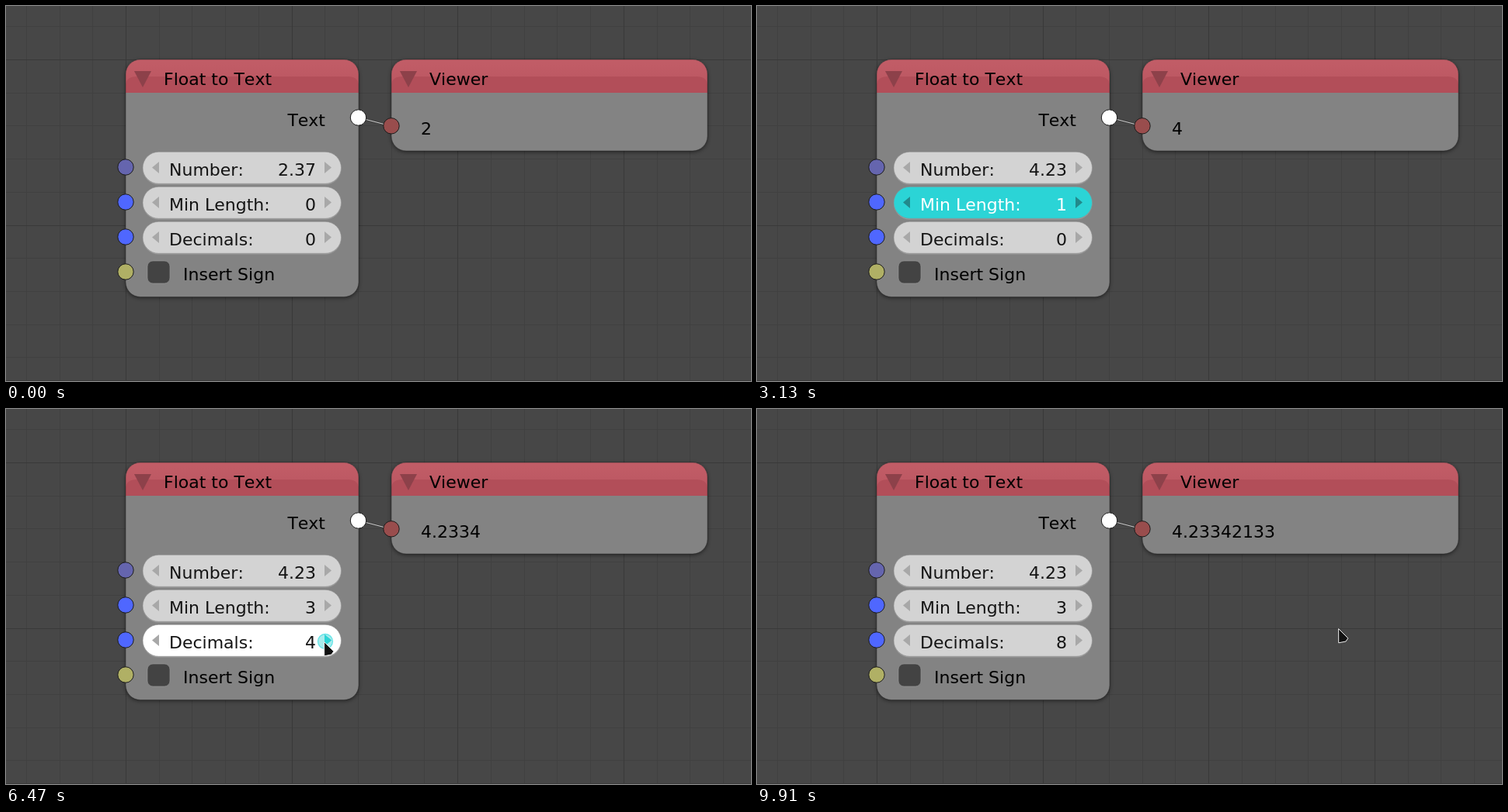
An HTML page that plays this animation: 959 by 484 pixels, repeating every 9950 ms.

```html
<!DOCTYPE html>
<html lang="en">
<head>
<meta charset="utf-8">
<title>Float to Text node</title>
<style>
  html, body { margin: 0; width: 100%; height: 100%; overflow: hidden; background: #474747; }
  svg { display: block; width: 959px; height: 484px; }
  text { font: 22px "DejaVu Sans", sans-serif; font-kerning: none; fill: #000; white-space: pre; }
  .end { text-anchor: end; }
  .field text { fill: #141414; }
  .pill { fill: #d3d3d3; stroke: #8a8a8a; stroke-opacity: .6; }
  .arrow { fill: #a8a8a8; }
  .hover .pill { fill: #fff; }
  .drag .pill { fill: #2bd4d6; }
  .drag .arrow { fill: #22898b; }
  .drag text { fill: #fff; }
</style>
</head>
<body>
<svg id="stage" viewBox="0 0 959 484">
  <defs>
    <linearGradient id="head" x1="0" y1="0" x2="0" y2="1">
      <stop offset="0" stop-color="#c25d67"/><stop offset="1" stop-color="#b95560"/>
    </linearGradient>
    <filter id="soft" x="-10%" y="-10%" width="120%" height="120%">
      <feGaussianBlur stdDeviation="2.5"/>
    </filter>
  </defs>
</svg>
<script>
const LOOP = 9950;
const stage = document.getElementById('stage');

function add(tag, attrs, parent = stage, label) {
  const el = document.createElementNS('http://www.w3.org/2000/svg', tag);
  for (const k in attrs) el.setAttribute(k, attrs[k]);
  if (label !== undefined) el.textContent = label;
  return parent.appendChild(el);
}

const write = (x, y, label, parent, cls = '') => add('text', { x, y, class: cls }, parent, label);

// ---- background grid, every fifth line darker ----
function grid(major) {
  const stroke = major ? '#393939' : '#404040';
  for (let i = -3; i < 19; i++) {
    if ((i % 5 === 0) !== major) continue;
    const shift = i * 42.72;
    add('path', { d: `M${Math.round(154 + shift) + .5} 0V484`, stroke });
    add('path', { d: `M0 ${Math.round(69 + shift) + .5}H959`, stroke });
  }
}
grid(false);
grid(true);
add('path', { d: 'M0 483.5H959', stroke: '#3a3a3a' });

// ---- nodes ----
function node(x, y, w, h, title) {
  const r = 19, box = { x, y, width: w, height: h, rx: r };
  add('rect', { ...box, y: y + 1.5, fill: '#000', opacity: .5, filter: 'url(#soft)' });
  add('rect', { ...box, fill: '#838383' });
  add('path', {
    d: `M${x} ${y + 43}v${r - 43}a${r} ${r} 0 0 1 ${r} ${-r}h${w - 2 * r}a${r} ${r} 0 0 1 ${r} ${r}v${43 - r}z`,
    fill: 'url(#head)'
  });
  add('path', { d: `M${x} ${y + 43}v-10q1 -11 14 -11h${w - 28}q13 0 14 11v10z`, fill: '#b24e59' });
  add('rect', { ...box, fill: 'none', stroke: '#222', 'stroke-opacity': .45 });
  add('path', { d: `M${x + 11} ${y + 15}h22l-11 21z`, fill: '#8d414a' });
  write(x + 49, y + 33, title);
}
node(154, 69, 300, 306.5, 'Float to Text');
node(496, 69, 407, 118, 'Viewer');
write(411, 155, 'Text', stage, 'end');
write(228, 354, 'Insert Sign');
const output = write(534, 166, '');

// ---- link and sockets ----
const link = { d: 'M454 144L496 155' };
add('path', { ...link, stroke: '#333', 'stroke-width': 3, opacity: .5 });
add('path', { ...link, stroke: '#c8c8c8', 'stroke-width': 1.2 });
const socket = (cx, cy, fill) => add('circle', { cx, cy, r: 10.2, fill, stroke: '#1c1c1c' });
['#6565ae', '#4f67ff', '#4f67ff', '#b0b065'].forEach((c, i) => socket(154, 208 + 45 * i, c));
socket(453.5, 144, '#fff');
socket(496, 154.8, '#994d4d');

// ---- number fields ----
const fields = ['Number:', 'Min Length:', 'Decimals:'].map((label, i) => {
  const y = 188 + 45 * i;
  const pill = { x: 176, width: 255.5, height: 41, rx: 20.5 };
  const g = add('g', {});
  add('rect', { ...pill, y: y + 1.5, fill: '#aaa', opacity: .7 }, g);
  add('rect', { ...pill, y: y + .3, class: 'pill' }, g);
  add('path', { class: 'arrow', d: `M188 ${y + 20.5}l9 -7.5v15z` }, g);
  add('path', { class: 'arrow', d: `M419 ${y + 20.5}l-9 -7.5v15z` }, g);
  write(210, y + 31, label, g);
  return { g, y, value: write(399, y + 31, '', g, 'end') };
});

const box = add('rect', { x: 182, y: 329, width: 29, height: 29, rx: 7, stroke: '#999', 'stroke-opacity': .6 });
const check = add('path', { d: 'M188 343l7 8l11 -19', fill: 'none', stroke: '#fff', 'stroke-width': 3.5 });

// ---- pointer and click pulse ----
const pulse = add('circle', { fill: '#2bd4d6', stroke: '#5fe3e6', 'stroke-width': 1.3 });
const pulseArrow = add('path', { d: 'M419 298.5l-9 -7.5v15z', fill: '#2bd4d6' });
const pointer = add('path', {
  d: 'M.6 .6L12.8 12.8L10 17L.7 18.8z',
  fill: '#111', stroke: '#eee', 'stroke-linejoin': 'round'
});

// ---- motion ----
const drags = [{ from: 640, to: 1670, row: 0 }, { from: 2620, to: 5140, row: 1 }];
const clicks = Array.from({ length: 8 }, (_, i) => 5870 + i * 193);
const presses = [...drags, ...clicks.map(to => ({ from: to - 60, to, row: 2 }))];
const tick = { on: 8150, off: 9170 };
const releases = [...presses.map(p => p.to), tick.on + 60, tick.off + 60];

// Each move is a quadratic curve; the pointer rests at its end.
const move = (from, to, a, c, b) => ({ from, to, a, c, b });
const line = (from, to, a, b) => move(from, to, a, a.map((v, k) => (v + b[k]) / 2), b);
const arrowSpot = [409, 300], boxSpot = [199, 341];
const moves = [
  line(270, 600, [164, 222], [289, 213]),
  line(1670, 1910, [370, 213], [289, 210]),
  line(1910, 2540, [289, 210], [290, 250]),
  move(5140, 5620, [329, 250], [280, 280], arrowSpot),
  move(7260, 7930, arrowSpot, [300, 440], [212, 359]),
  line(7930, 8140, [212, 359], boxSpot),
  move(9230, 9720, boxSpot, [400, 550], [748, 283])
];

const lastBefore = (list, t, time) => list.filter(s => time(s) <= t).pop();

function pointerAt(t) {
  const m = lastBefore(moves, t, s => s.from);
  if (!m || drags.some(d => t >= d.from && t < d.to)) return null;
  const u = Math.min(1, (t - m.from) / (m.to - m.from)), w = 1 - u;
  return m.a.map((v, k) => w * w * v + 2 * w * u * m.c[k] + u * u * m.b[k]);
}

// Counts 1..n in even steps, the first at `from` and the last at `to`.
function count(t, from, to, n) {
  return t < from ? 0 : Math.min(n, 1 + Math.floor((t - from) / (to - from) * (n - 1)));
}

function numberAt(t) {
  const u = Math.min(1, Math.max(0, (t - 680) / 690));
  return 2.37 + (4.23342133 - 2.37) * (1 - (1 - u) ** 2);
}

const show = (el, on) => el.setAttribute('visibility', on ? 'visible' : 'hidden');

function drawPulse(t) {
  const hit = lastBefore(releases, t, r => r);
  const age = t - hit, on = age < 300;
  show(pulse, on);
  show(pulseArrow, age < 90 && clicks.includes(hit));
  if (!on) return;
  const [x, y] = pointerAt(hit);
  pulse.setAttribute('cx', x + 2);
  pulse.setAttribute('cy', y);
  pulse.setAttribute('r', 9.5 + 3.8 * (age / 300) ** 2);
  pulse.setAttribute('fill-opacity', Math.max(0, .5 - age / 240));
  pulse.setAttribute('stroke-opacity', 1 - age / 300);
}

function draw(t) {
  const at = pointerAt(t);
  const press = presses.find(p => t >= p.from && t < p.to);
  const number = numberAt(t);
  const length = count(t, 3080, 3480, 6) - count(t, 4000, 4170, 5) + count(t, 4580, 4750, 2);
  const decimals = clicks.filter(c => c <= t).length;
  const sign = t >= tick.on && t < tick.off;

  [number.toFixed(2), length, decimals].forEach((v, i) => {
    const f = fields[i];
    f.value.textContent = v;
    const over = at && at[0] >= 176 && at[0] <= 431 && at[1] >= f.y && at[1] <= f.y + 45;
    f.g.setAttribute('class', 'field ' + (press && press.row === i ? 'drag' : over ? 'hover' : ''));
  });
  output.textContent = (sign ? '+' : '') + number.toFixed(decimals).padStart(length, '0');
  box.setAttribute('fill', sign ? '#2bd4d6' : '#434343');
  show(check, sign);

  drawPulse(t);
  show(pointer, at);
  if (at) pointer.setAttribute('transform', `translate(${at.map(Math.round).join(' ')})`);
}

const start = performance.now();
function frame() {
  draw((performance.now() - start) % LOOP);
  requestAnimationFrame(frame);
}
frame();
</script>
</body>
</html>
```
